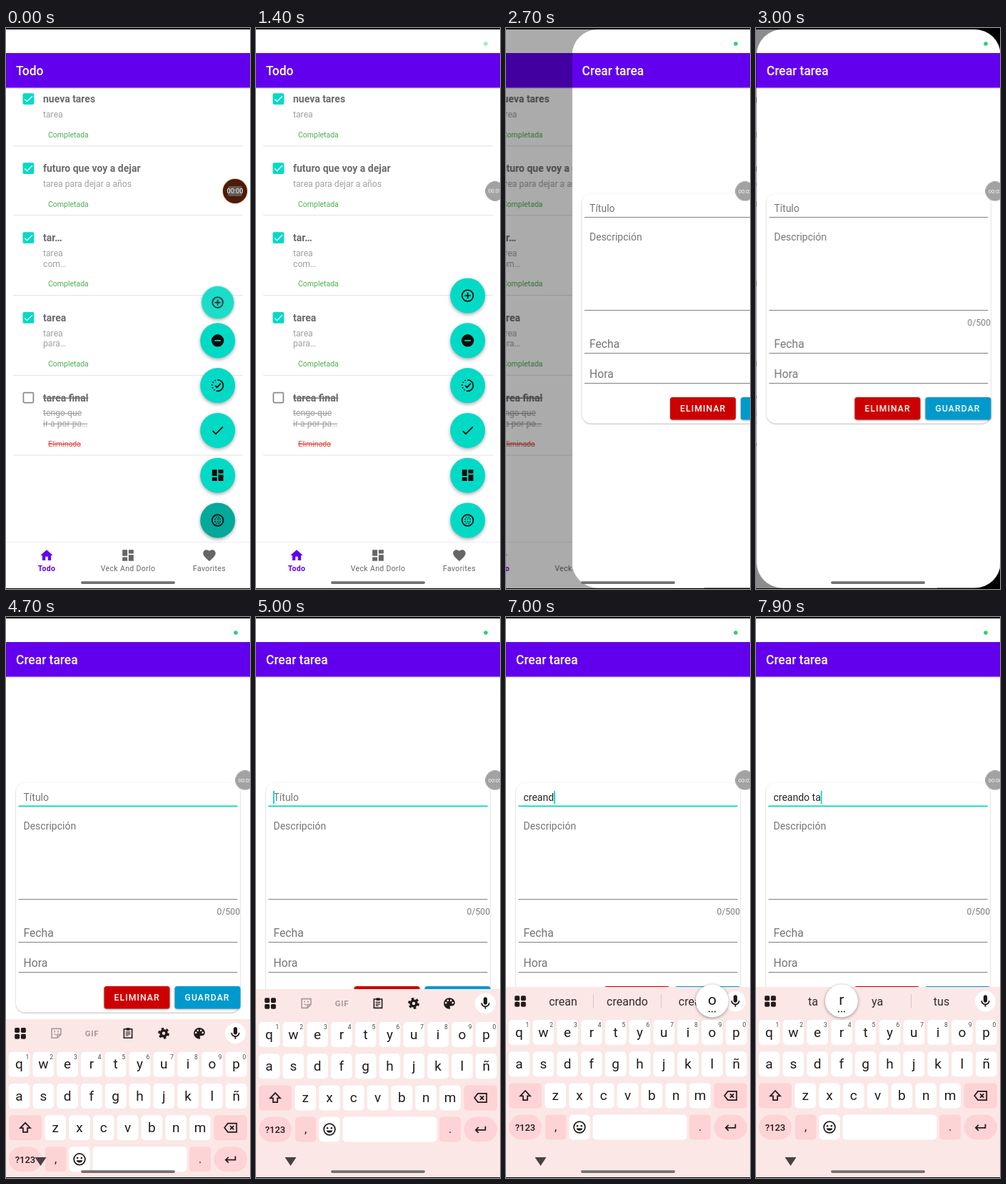
These frames come from a looping animation (342 by 784 pixels, 8 s). An HTML page:

```html
<!DOCTYPE html>
<html lang="es">
<head>
<meta charset="utf-8">
<title>Todo</title>
<style>
html, body { margin: 0; width: 100%; height: 100%; overflow: hidden; background: #000; }
svg, .page { position: absolute; left: 0; top: 0; width: 342px; height: 784px; }
.page { background: #fff; clip-path: inset(2px 0 1.5px); }
text { font-family: Roboto, sans-serif; fill: #757575; white-space: pre; }
.bar { font-size: 17.45px; font-weight: 500; fill: #fff; }
.name { font-size: 14px; font-weight: 700; fill: #6c6c6c; }
.note { font-size: 12.2px; fill: #a0a0a0; }
.state { font-size: 10.5px; fill: #4caf50; }
.gone { text-decoration: line-through; }
.gone.state { fill: #dc4a40; }
.tab { font-size: 10.5px; letter-spacing: .35px; text-anchor: middle; fill: #666; }
.tab.on { font-weight: 700; fill: #6200ee; }
.field { font-size: 14px; }
.big { font-size: 15.7px; }
.btn { font-size: 12.2px; font-weight: 500; letter-spacing: 1.09px; fill: #fff; }
.key { font-size: 19px; text-anchor: middle; fill: #231b1b; }
.hint { font-size: 8.5px; text-anchor: middle; fill: #4f4444; }
.sug { font-size: 16px; text-anchor: middle; fill: #332a2a; }
.line { fill: none; stroke: currentColor; stroke-width: 2; }
.fab circle.disc { fill: #03dac5; filter: drop-shadow(0 2.5px 2.5px #0005); }
.fab { transform-box: fill-box; transform-origin: center; animation: fold 8s infinite; animation-delay: calc(var(--i) * -35ms); }
.top { transform-box: fill-box; transform-origin: center; animation: settle 8s infinite; }
.fab.main { animation: none; }
.fab.main circle.disc { animation: release 8s infinite; }
#old { animation: leave 8s infinite; }
#form { animation: enter 8s infinite; }
#kb { animation: rise 8s infinite; }
#tri { animation: arrive 8s infinite; }
#focus { animation: focus 8s infinite; }
#dot { animation: dot 8s infinite; }
#bubble { animation: dock 8s infinite; }
#disc { animation: grey 8s infinite; }
.warm { animation: cool 8s infinite; }
@keyframes fold {
  0%, 26.9% { transform: none; opacity: 1; animation-timing-function: ease-in; }
  30%, 100% { transform: translateY(50px) scale(.3); opacity: 0; }
}
@keyframes settle {
  0% { transform: translateY(9.5px) scale(.93); opacity: .9; animation-timing-function: ease-out; }
  2.5%, 100% { transform: none; opacity: 1; }
}
@keyframes release { 0%, 1.25% { fill: #03a99a; } 6%, 100% { fill: #03dac5; } }
@keyframes leave {
  0%, 32.5% { transform: none; filter: none; animation-timing-function: cubic-bezier(.2,.7,.2,1); }
  37.5%, 100% { transform: translateX(-88px); filter: brightness(.55); }
}
@keyframes enter {
  0%, 32.5% { transform: translateX(342px); clip-path: inset(2px 0 1.5px round 36px); animation-timing-function: cubic-bezier(.2,.7,.2,1); }
  37.5% { transform: translateX(.8px); clip-path: inset(2px 0 1.5px round 36px); }
  41%, 100% { transform: none; clip-path: inset(2px 0 1.5px round 0px); }
}
@keyframes rise {
  0%, 54.6% { transform: translateY(275px); animation-timing-function: cubic-bezier(.3,.3,.5,1); }
  58.75% { transform: translateY(45px); animation-timing-function: ease-out; }
  63.5%, 100% { transform: none; }
}
@keyframes arrive { 0%, 54.9% { opacity: 0; } 55%, 100% { opacity: 1; } }
@keyframes focus { 0%, 48.7% { opacity: 0; } 48.75%, 100% { opacity: 1; } }
@keyframes dot { 0%, 13% { opacity: 0; } 17.5% { opacity: .45; } 22%, 100% { opacity: 1; } }
@keyframes dock {
  0%, 3% { transform: translate(321px, 228px); animation-timing-function: ease-in-out; }
  11%, 100% { transform: translate(335px, 228px) scale(.8); }
}
@keyframes grey { 0%, 3% { fill: #4a1d0a; } 11%, 100% { fill: #a2a2a2; } }
@keyframes cool { 0%, 3% { opacity: 1; } 11%, 100% { opacity: 0; } }
</style>
</head>
<body>
<div class="page" id="old"><svg id="list" viewBox="0 0 342 784"></svg></div>
<div class="page" id="form"><svg id="edit" viewBox="0 0 342 784"></svg></div>
<svg viewBox="0 0 342 784">
  <circle id="dot" cx="322" cy="22" r="2.8" fill="#2fd068"/>
  <rect x="105" y="773.3" width="132" height="3.6" rx="1.8" fill="#727070"/>
  <g id="bubble">
    <circle class="warm" r="18" fill="#f6cfb4"/>
    <circle class="warm" r="17" fill="#d98d5c"/>
    <circle id="disc" r="17"/>
    <rect class="warm" x="-10" y="-7" width="20" height="14" rx="3" fill="#625954"/>
    <text id="count" y="3.3" text-anchor="middle" style="font-size:9.2px;fill:#fff"></text>
  </g>
</svg>
<script>
const $ = id => document.getElementById(id);
const text = (x, y, s, cls, more = '') => `<text x="${x}" y="${y}" class="${cls}" ${more}>${s}</text>`;
const rect = (x, y, w, h, r, fill, more = '') =>
  `<rect x="${x}" y="${y}" width="${w}" height="${h}" rx="${r}" fill="${fill}" ${more}/>`;
const path = (d, more = '') => `<path d="${d}" ${more}/>`;
const line = (d, w = 2) => path(d, `class="line" style="stroke-width:${w}"`);
const dot = (x, y, r, more = '') => `<circle cx="${x}" cy="${y}" r="${r}" ${more}/>`;
const ring = (r, more = '') => dot(12, 12, r, 'class="line" ' + more);
// Icons are drawn on a 24 unit grid.
const icon = (x, y, body, color = '#231b1b', s = .872) =>
  `<g transform="translate(${x} ${y}) scale(${s}) translate(-12 -12)" fill="${color}" color="${color}">${body}</g>`;
const header = title => rect(0, 35, 342, 48.7, 0, '#6200ee') +
  rect(0, 83.7, 342, 1, 0, '#dcdcdc') + text(14, 66.3, title, 'bar');

const tick = path('M9 16.17L4.83 12l-1.42 1.41L9 19 21 7l-1.41-1.41z');
const board = path('M3 13h8V3H3v10zm0 8h8v-6H3v6zm10 0h8V11h-8v10zm0-18v6h8V3h-8z');
const home = path('M10 20v-6h4v6h5v-8h3L12 3 2 12h3v8z');
const heart = path('M12 21.35l-1.45-1.32C5.4 15.36 2 12.28 2 8.5 2 5.42 4.42 3 7.5 3c1.74 0 3.41.81 4.5 2.09C13.09 3.81 14.76 3 16.5 3 19.58 3 22 5.42 22 8.5c0 3.78-3.4 6.86-8.55 11.54z');

function item(b, name, notes, open) {
  const gone = open ? ' gone' : '';
  const shift = notes.length > 1 ? 14.7 : 0;
  const box = open
    ? rect(24.4, b - 12, 14, 14, 1.5, 'none', 'stroke="#8a8a8a" stroke-width="1.75"')
    : rect(23.5, b - 12.8, 15.8, 15.8, 2, '#03dac5') + icon(31.4, b - 4.9, tick, '#fff', .66);
  return box + text(52, b, name, 'name' + gone) +
    notes.map((n, i) => text(52, b + 20.8 + i * 14.7, n, 'note' + gone)).join('') +
    text(59, b + 48.6 + shift, open ? 'Eliminada' : 'Completada', 'state' + gone) +
    rect(10, b + 60.3 + shift, 322, 1, 0, '#e3e3e3');
}

const fabIcons = [
  ring(9) + line('M12 7v10M7 12h10'),
  dot(12, 12, 10) + path('M7 11h10v2H7z', 'fill="#03dac5"'),
  line('M12 3a9 9 0 0 1 0 18') +
    path('M12 21a9 9 0 0 1 0-18', 'class="line" stroke-dasharray="2 2.6"') + line('M8 12l3 3 6-6.5'),
  tick,
  board,
  ring(9) + path('M8 10h9M8 14h9M10 7h5M10 17h5M6.5 12h0M17.5 12h0',
    'class="line" stroke-dasharray="0 4" stroke-linecap="round"')
];
const fab = (body, i) => {
  const y = 374 + i * 62.8;
  const g = `<g class="fab${i == 5 ? ' main' : ''}" style="--i:${i}">` +
    dot(296.7, y, 24.5, 'class="disc"') + icon(296.7, y, body, '#0b0b0b') + '</g>';
  return i ? g : `<g class="top">${g}</g>`;
};

$('list').innerHTML = header('Todo') +
  item(104, 'nueva tares', ['tarea']) +
  item(201, 'futuro que voy a dejar', ['tarea para dejar a años']) +
  item(298, 'tar…', ['tarea', 'com…']) +
  item(409.8, 'tarea', ['tarea', 'para…']) +
  item(521.5, 'tarea final', ['tengo que', 'ir a por pa…'], true) +
  rect(0, 718, 342, 1, 0, '#eeeeee') +
  icon(57, 737, home, '#6200ee') + icon(171, 737, board, '#666') + icon(285, 737, heart, '#666') +
  text(57, 759.3, 'Todo', 'tab on') + text(171, 759.3, 'Veck And Dorlo', 'tab') + text(285, 759.3, 'Favorites', 'tab') +
  fabIcons.map(fab).join('');

const rule = y => rect(17.5, y, 307, 1, 0, '#808080');
const button = (x, s, fill) => rect(x, 516, 92, 31.5, 3.5, fill, 'style="filter:drop-shadow(0 1px 1px #0005)"') +
  text(x + 14, 536.2, s, 'btn');

// Keyboard
const pink = '#fdd3d5', ink = '#231b1b';
const places = {};
const colX = i => 18.5 + 33.8 * i;
function row(chars, y, from, digits) {
  return [...chars].map((c, i) => {
    const x = colX(from + i);
    places[c] = [x, y];
    return rect(x - 14.8, y - 17.5, 29.6, 35, 5, '#fff') + text(x, y + 6.2, c, 'key') +
      (digits ? text(x + 11.3, y - 7.5, (i + 1) % 10, 'hint') : '');
  }).join('');
}
const mic = path('M12 14c1.66 0 3-1.34 3-3V5c0-1.66-1.34-3-3-3S9 3.34 9 5v6c0 1.66 1.34 3 3 3zM17 11c0 2.76-2.24 5-5 5s-5-2.24-5-5H5c0 3.53 2.61 6.43 6 6.92V21h2v-3.08c3.39-.49 6-3.39 6-6.92z');
const squares = [[3, 3], [13, 3], [3, 13], [13, 13]].map(([x, y]) => rect(x, y, 8, 8, 2, ink)).join('');
const sticker = line('M4 4h16v10l-6 6H4zM14 20v-6h6') + dot(9, 9, 1.3) + dot(15, 9, 1.3) + line('M8 13q2 2 4 1', 1.5);
const clip = line('M5 4.5h14V20H5z') + path('M9 2.5h6V7H9z') + line('M8 10h8M8 13h8M8 16h5', 1.5);
const gear = ring(5, 'style="stroke-width:4.5"') + ring(8.2, 'style="stroke-width:3.4" stroke-dasharray="4.3 4.29"');
const palette = path('M12 3a9 9 0 0 0 0 18c.83 0 1.5-.67 1.5-1.5 0-.9-.77-1.1-.77-2 0-.83.67-1.5 1.5-1.5H16c2.76 0 5-2.24 5-5 0-4.42-4.03-8-9-8z') +
  [[6.5, 11], [9.5, 7.3], [14.5, 7.3], [17.5, 11]].map(([x, y]) => dot(x, y, 1.5, 'fill="#fbe7e6"')).join('');
const face = ring(9) + dot(8.7, 10, 1.5) + dot(15.3, 10, 1.5) + path('M7 13.7h10a5.2 5.2 0 0 1-10 0z');

const keyboard = rect(0, 517, 342, 320, 0, '#fbe7e6') +
  icon(20, 537, squares) + dot(321.5, 537, 14.5, 'fill="#fff"') + icon(321.5, 537, mic) +
  '<g id="tools">' + icon(70.5, 537, sticker, '#a59a9a', .8) +
  text(120.5, 541, 'GIF', 'hint', 'style="font-size:11.5px;font-weight:700;letter-spacing:.6px;fill:#a59a9a"') +
  icon(171, 537, clip, ink, .8) + icon(221, 537, gear, ink, .8) + icon(271, 537, palette) + '</g>' +
  '<g id="words">' + rect(122, 527, 1, 20, 0, '#d6c6c6') + rect(217, 527, 1, 20, 0, '#d6c6c6') +
  [80, 170, 260].map(x => text(x, 542.5, '', 'sug')).join('') + '</g>' +
  row('qwertyuiop', 580.5, 0, true) + row('asdfghjklñ', 624.7, 0) + row('zxcvbnm', 669, 1.5) +
  rect(4, 651.5, 46, 35, 5, pink) + icon(27, 669, line('M12 4L4 12.5h4.5V19h7v-6.5H20z')) +
  rect(291.5, 651.5, 46.5, 35, 5, pink) + icon(314.5, 669, line('M8 5H22V19H8L2.5 12zM11.5 9l6 6m0-6l-6 6')) +
  rect(4, 695.5, 46, 35, 17.5, pink) + text(27, 717.8, '?123', 'key', 'style="font-size:13px;font-weight:500"') +
  rect(55, 695.5, 29.5, 35, 5, pink) + text(69.5, 718, ',', 'key', 'style="font-size:16px"') +
  rect(88.5, 695.5, 29, 35, 5, '#fff') + icon(103, 713, face) +
  rect(121.5, 695.5, 132, 35, 5, '#fff') +
  rect(257, 695.5, 30, 35, 5, pink) + text(272, 718, '.', 'key', 'style="font-size:16px"') +
  rect(291.5, 695.5, 46.5, 35, 17.5, pink) + icon(314.5, 713, line('M20 7v6H5M9 8.5L4.5 13 9 17.5')) +
  '<g id="pop">' + dot(0, 0, 23, 'fill="#fff" style="filter:drop-shadow(0 1px 2px #0006)"') +
  text(0, 5, '', 'key', 'id="letter" style="font-size:21px"') +
  [-4, 0, 4].map(x => dot(x, 15, 1, `fill="${ink}"`)).join('') + '</g>';

$('edit').innerHTML = header('Crear tarea') +
  rect(14, 231.5, 314, 321, 13, '#fff', 'style="filter:drop-shadow(0 1.2px 1.2px #0004)"') +
  text(24.5, 257.3, '', 'field', 'id="title"') +
  rule(264) + rect(17.5, 263.4, 307, 2, 0, '#1fd6c4', 'id="focus"') +
  rect(0, 243, 1.8, 18, 0, '#03dac5', 'id="caret"') +
  text(24.5, 297, 'Descripción', 'field') + rule(394) +
  text(328, 416, '0/500', 'note', 'text-anchor="end" style="fill:#7d7d7d"') +
  text(24.5, 446.8, 'Fecha', 'big') + rule(454) + text(24.5, 488.8, 'Hora', 'big') + rule(496) +
  button(137.5, 'ELIMINAR', '#cc0000') + button(236.5, 'GUARDAR', '#0099cc') +
  `<g id="kb">${keyboard}</g>` + path('M40.5 755h16l-8 12z', 'id="tri" fill="#4a4040"');

// Key presses: time and letter; the letter lands on release.
const presses = [[5270, 'c'], [5570, 'r'], [5740, 'e'], [6370, 'a'], [6680, 'n'], [6830, 'd'],
  [6980, 'o'], [7120, ' '], [7240, 't'], [7370, 'a'], [7870, 'r']];
const hold = 120;
const guesses = [[5690, 'cr', 'creo', 'crees'], [5860, 'cre', 'creo', 'crea'], [6490, 'crea', 'crear', 'cera'],
  [6800, 'crean', 'creando', 'crear'], [7100, 'creando', 'creado', 'creo'], [7240, 'la', 'un', 'una'],
  [7360, 'te', 'tu', 'todo'], [7690, 'ta', 'ya', 'tus']];
const slots = document.querySelectorAll('#words text');
const show = (id, on) => { $(id).style.display = on ? '' : 'none'; };

function draw(t) {
  $('count').textContent = '00:0' + Math.floor((t + 400) / 1000);

  const typed = presses.filter(p => t >= p[0] + hold).map(p => p[1]).join('');
  const title = $('title');
  title.textContent = typed || 'Título';
  title.style.fill = typed ? '#262626' : '';
  $('caret').setAttribute('x', 24.5 + (typed ? title.getComputedTextLength() : -.5));
  show('caret', t >= 3900 && (t < 4400 || t >= 4900));

  const guess = guesses.filter(g => t >= g[0]).pop();
  show('tools', !guess);
  show('words', guess);
  slots.forEach((s, i) => { s.textContent = guess ? guess[i + 1] : ''; });

  const press = presses.find(p => t >= p[0] && t < p[0] + hold && places[p[1]]);
  show('pop', press);
  if (press) {
    const [x, y] = places[press[1]];
    $('pop').setAttribute('transform', `translate(${Math.max(x, 23)} ${y - 44})`);
    $('letter').textContent = press[1];
  }
}

const start = performance.now();
document.getAnimations().forEach(a => { a.startTime = start; });
function frame(now) {
  draw(Math.max(0, now - start) % 8000);
  requestAnimationFrame(frame);
}
draw(0);
requestAnimationFrame(frame);
</script>
</body>
</html>
```
